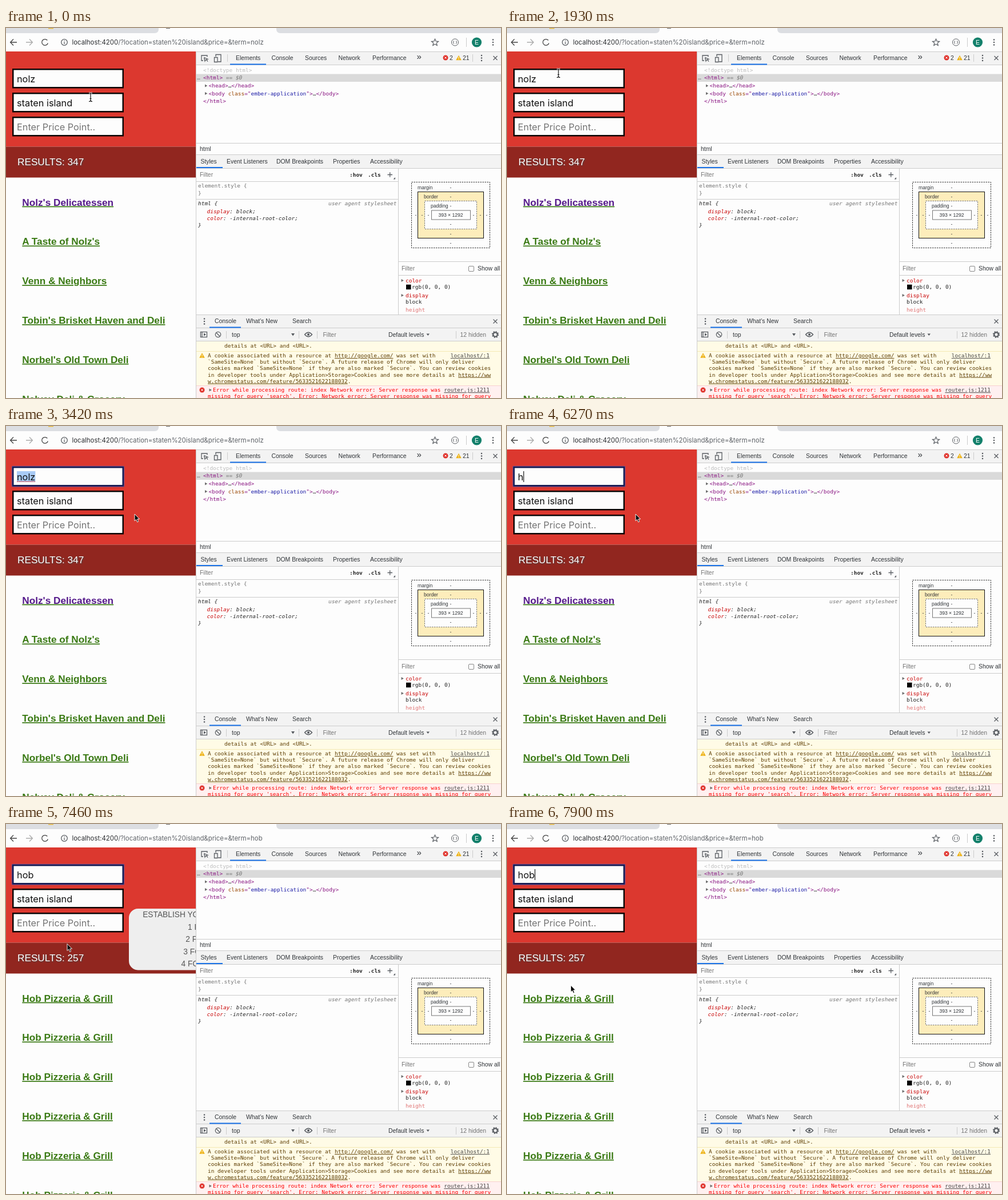
Recreate the animation shown at these times as an HTML page. Size 866 px wide and 647 px high, loop 8000 ms.

```html
<!DOCTYPE html>
<html lang="en">
<head>
<meta charset="utf-8">
<title>Restaurant search</title>
<style>
html, body { margin: 0; width: 100%; height: 100%; overflow: hidden; background: #fdfdfd; }
svg { display: block; }
text { white-space: pre; }
.ui { font: 10.4px "Liberation Sans", Arial, sans-serif; fill: #303438; }
.mono { font: 9.46px "DejaVu Sans Mono", Menlo, monospace; fill: #222; }
.field { font: 16.3px Inter, sans-serif; fill: #111; }
.url { font: 11.4px Inter, sans-serif; fill: #5f6368; }
.page { font: 17.2px "Liberation Sans", Arial, sans-serif; }
.links { font-weight: bold; fill: #3a7a14; text-decoration: underline; }
.seen { fill: #551a8b; }
.count { fill: #fff; filter: drop-shadow(1.8px 1.8px 0.8px #4a4a4a); }
.tip { font-size: 13.76px; fill: #555; text-anchor: middle; }
.box { font-size: 8.6px; }
.dim { fill: #757575; }
.tag { fill: #881280; }
.attr { fill: #994500; }
.val { fill: #1a1aa6; }
.prop { fill: #c80000; }
.warn { fill: #5c3c00; }
.err { fill: #f00; }
.it { font-style: italic; }
.u { text-decoration: underline; }
.end { text-anchor: end; }
.mid { text-anchor: middle; }
.line { stroke: #ccc; fill: none; }
.ico { stroke: #5a5e63; stroke-width: 1.3; fill: none; }
.blue { fill: #1a73e8; }
</style>
</head>
<body>
<svg width="866" height="647" viewBox="0 0 866 647">
  <defs>
    <path id="tri" d="M0-2.6L4.4 0L0 2.6Z" fill="#6e6e6e"/>
    <g id="dots" fill="#55595e"><circle cy="-4.4" r="1.25"/><circle r="1.25"/><circle cy="4.4" r="1.25"/></g>
    <path id="close" d="M-3.5-3.5L3.5 3.5M3.5-3.5L-3.5 3.5" class="ico"/>
    <g id="alert"><path d="M0-4.3L4.8 4.2H-4.8Z" fill="#eeb214"/><path d="M0-1.4V1.4M0 2.3V3.3" stroke="#fff"/></g>
    <g id="fail"><circle r="4.5" fill="#e0332c"/><path d="M-1.7-1.7L1.7 1.7M1.7-1.7L-1.7 1.7" stroke="#fff"/></g>
  </defs>
  <rect width="866" height="647" fill="#fdfdfd"/>

  <!-- browser bar -->
  <path d="M0 0H267V2Q267 9 260 9H0ZM473 0H866V9H480Q473 9 473 2Z" fill="#dcdee2"/>
  <rect x="74" width="9" height="1.4" fill="#e8b93a"/>
  <rect x="280" width="7" height="1" fill="#666"/>
  <g class="ico" stroke-width="1.6">
    <path d="M19 25H8M13 19.5L7.6 25L13 30.5" stroke="#444"/>
    <path d="M35 25H46M41 19.5L46.400 25L41 30.500" stroke="#aaa"/>
    <path d="M72.300 21.500A5.400 5.400 0 1 0 73.300 26.500" stroke="#444"/>
    <circle cx="102" cy="25" r="5.300"/>
    <path d="M102 24.300V28M102 21.800V23"/>
    <path d="M750.500 19.200L752.200 23.200L756.500 23.500L753.200 26.300L754.200 30.500L750.500 28.200L746.800 30.500L747.800 26.300L744.500 23.500L748.800 23.200Z" stroke-width="1.200"/>
    <circle cx="785.500" cy="25" r="6" stroke-width="1"/>
    <path d="M784 22.500Q782.700 22.500 783 24Q783 25 782 25Q783 25 783 26Q782.700 27.500 784 27.500M787 22.500Q788.300 22.500 788 24Q788 25 789 25Q788 25 788 26Q788.300 27.500 787 27.500" stroke-width=".9"/>
  </g>
  <path d="M805.500 17V33" class="line"/>
  <circle cx="823.500" cy="25" r="8.600" fill="#13806b"/>
  <text x="823.500" y="28.500" class="ui mid" style="fill:#fff">E</text>
  <use href="#dots" x="852" y="25"/>
  <text x="115.500" y="29.200" class="url"><tspan fill="#2b2d30">localhost:4200</tspan>/?location=staten%20island&amp;price=&amp;term=<tspan id="term"></tspan></text>

  <!-- search page -->
  <rect y="41" width="333" height="166.500" fill="#dc382f"/>
  <rect y="207.500" width="333" height="54" fill="#91261f"/>
  <rect id="glow" x="9.800" y="69.800" width="197.400" height="37" rx="2" fill="#4a4fa0" opacity=".75"/>
  <g fill="#fdfdfd" stroke="#0b0505" stroke-width="2.500">
    <rect id="query-box" x="12.250" y="72.250" width="192.500" height="32"/>
    <rect x="12.250" y="114.250" width="192.500" height="32"/>
    <rect x="12.250" y="156.250" width="192.500" height="32"/>
  </g>
  <rect id="selection" y="79" height="19" fill="#a9cbf6"/>
  <g class="field">
    <text id="query" x="19" y="94.700"></text>
    <text x="19" y="136.700">staten island</text>
    <text x="19" y="178.700" class="dim">Enter Price Point..</text>
  </g>
  <path id="spell" d="M19.500 97.300H51" stroke="#e03a34" stroke-width="1.500" stroke-dasharray="1.500 1.200"/>
  <rect id="caret" y="79" width="1.100" height="19"/>
  <text x="20" y="240" class="page count">RESULTS: <tspan id="count"></tspan></text>
  <g id="links" class="page links"></g>
  <g id="tip">
    <rect x="215" y="148" width="258" height="107.500" rx="16" fill="#eee"/>
    <g class="page tip">
      <text x="344" y="163.300">ESTABLISH YOUR PRICE POINT</text>
      <text x="344" y="184.800">1 FOR $</text>
      <text x="344" y="206.300">2 FOR $$</text>
      <text x="344" y="227.800">3 FOR $$$</text>
      <text x="344" y="249.300">4 FOR $$$$</text>
    </g>
  </g>

  <!-- developer tools -->
  <rect x="332" y="41" width="534" height="606" fill="#fdfdfd"/>
  <path d="M333 41H866V64H333ZM333 222H866V245H333ZM333 501H866V547H333Z" fill="#f3f3f3"/>
  <rect x="333" y="80.500" width="533" height="13.500" fill="#dadada"/>
  <path d="M333 547.500H866V626H333Z" fill="#fffbe6"/>
  <rect x="333" y="626" width="533" height="21" fill="#fff0f0"/>
  <path d="M333 565.500H866" stroke="#f5e9b4"/>
  <path d="M333 625.500H866" stroke="#f8d0d0"/>
  <path class="line" d="M332.500 41V647M0 41.500M333 41.500H866M333 64.500H866M333 201.500H866M333 221.500H866M333 245.500H866M333 268.500H686M333 299.500H686M686.500 246V501M687 408.500H866M687 432.500H866M333 501.500H866M333 524.500H866M333 547.500H866M387.500 46V59M816.500 46V59M385.500 530V543M512.500 530V543M544.500 530V543M787.500 530V543"/>
  <path class="blue" d="M392 62.500H455V64.500H392ZM333 243H379V245H333ZM356 522.500H411V524.500H356Z"/>

  <g class="ico" stroke-width="1.200">
    <path d="M345 57H342V48H352V50.500M346.500 51.500L353 54.500L350.200 55.200L353 58.500M346.500 51.500L348 58L349.500 55.500"/>
    <path d="M367 50V46.500H376V59H371M364.500 51.500H370V59.500H364.500Z"/>
    <rect x="340.500" y="531.500" width="11" height="9"/>
    <path d="M343 532V540"/>
    <circle cx="371" cy="536" r="4.700"/><path d="M367.700 532.700L374.300 539.300"/>
    <path d="M522.500 536Q529 528.500 535.500 536Q529 543.500 522.500 536Z"/>
    <circle cx="856" cy="536" r="3.700" stroke-width="2.300"/>
    <circle cx="856" cy="536" r="5.300" stroke-width="1.600" stroke-dasharray="2.080"/>
    <path d="M667.500 256.500H676M671.700 252.300V260.700"/>
    <rect x="809.500" y="416.500" width="9" height="9" rx="1.500" fill="#fff" stroke="#888" stroke-width="1"/>
  </g>
  <g fill="#55595e">
    <circle cx="529" cy="536" r="2"/>
    <path d="M346 533.500L350 536L346 538.500ZM499 534H505L502 538.500ZM735.500 534.500H741L738.200 538ZM681 261V264.500H677.500Z"/>
  </g>
  <use href="#dots" x="832" y="52.500"/><use href="#dots" x="347" y="513"/>
  <use href="#close" x="856" y="52.500"/><use href="#close" x="856" y="513"/>
  <use href="#fail" x="769" y="52"/><use href="#fail" x="343" y="633"/>
  <use href="#alert" x="792" y="52"/><use href="#alert" x="343" y="572.500"/>
  <use href="#tri" x="348" y="101"/><use href="#tri" x="348" y="114.500"/>
  <use href="#tri" x="691.500" y="441.500"/><use href="#tri" x="691.500" y="467.500"/>
  <use href="#tri" x="355.500" y="633"/>

  <!-- labels: y is the middle of the line -->
  <g class="ui" transform="translate(0 3.700)">
    <text x="402" y="52.500">Elements</text><text x="464.500" y="52.500">Console</text>
    <text x="523" y="52.500">Sources</text><text x="581.500" y="52.500">Network</text>
    <text x="641" y="52.500">Performance</text><text x="718.500" y="51.500" font-size="15">»</text>
    <text x="776" y="52.500">2</text><text x="799" y="52.500">21</text>
    <text x="339" y="211.500">html</text>
    <text x="340.500" y="233">Styles</text><text x="386" y="233">Event Listeners</text>
    <text x="473" y="233">DOM Breakpoints</text><text x="572" y="233">Properties</text>
    <text x="637" y="233">Accessibility</text>
    <text x="339" y="256.500" class="dim">Filter</text><text x="692" y="420.500" class="dim">Filter</text>
    <text x="825" y="420.500">Show all</text>
    <text x="365" y="512.500">Console</text><text x="420" y="512.500">What's New</text><text x="501" y="512.500">Search</text>
    <text x="395" y="536">top</text><text x="554.500" y="536" class="dim">Filter</text>
    <text x="669" y="536">Default levels</text><text x="794.500" y="536" class="dim">12 hidden</text>
  </g>

  <g class="mono" transform="translate(0 3.200)">
    <text x="345" y="73.500" fill="#bdbdbd">&lt;!doctype html&gt;</text>
    <text x="334" y="87" class="dim">…</text>
    <text x="345" y="87" class="tag">&lt;html&gt;<tspan class="dim"> == <tspan class="it">$0</tspan></tspan></text>
    <text x="354.500" y="101" class="tag">&lt;head&gt;<tspan fill="#222">…</tspan>&lt;/head&gt;</text>
    <text x="354.500" y="114.500" class="tag">&lt;body <tspan class="attr">class</tspan>="<tspan class="val">ember-application</tspan>"&gt;<tspan fill="#222">…</tspan>&lt;/body&gt;</text>
    <text x="345" y="128.300" class="tag">&lt;/html&gt;</text>

    <g font-weight="bold"><text x="601" y="256.500">:hov</text><text x="633" y="256.500">.cls</text></g>
    <text x="336" y="275.500" class="dim">element.style {</text><text x="336" y="289" class="dim">}</text>
    <g class="it">
      <text x="336" y="306.500">html {</text>
      <text x="683.500" y="306.500" class="dim end">user agent stylesheet</text>
      <text x="351.500" y="320.500"><tspan class="prop">display</tspan>: block;</text>
      <text x="351.500" y="332.500"><tspan class="prop">color</tspan>: -internal-root-color;</text>
      <text x="336" y="344.500">}</text>
    </g>
    <rect x="700" y="445.500" width="8.500" height="8.500" fill="#000"/>
    <text x="699" y="441.500" class="prop">color</text><text x="710" y="453">rgb(0, 0, 0)</text>
    <text x="699" y="467.500" class="prop">display</text><text x="699" y="478.500">block</text>
    <text x="699" y="493" class="prop" opacity=".55">height</text>

    <g class="warn">
      <text x="382" y="556">details at &lt;URL&gt; and &lt;URL&gt;.</text>
      <text x="353" y="573">A cookie associated with a resource at <tspan class="u">http://google.com/</tspan> was set with</text>
      <text x="846" y="573" class="u end" fill="#444">localhost/:1</text>
      <text x="353" y="584.200">`SameSite=None` but without `Secure`. A future release of Chrome will only deliver</text>
      <text x="353" y="595.300">cookies marked `SameSite=None` if they are also marked `Secure`. You can review cookies</text>
      <text x="353" y="606.400">in developer tools under Application&gt;Storage&gt;Cookies and see more details at <tspan class="u">https://ww</tspan></text>
      <text x="353" y="617.500"><tspan class="u">w.chromestatus.com/feature/5633521622188032</tspan>.</text>
    </g>
    <g class="err">
      <text x="362" y="633">Error while processing route: index Network error: Server response was</text>
      <text x="846" y="633" class="u end" fill="#444">router.js:1211</text>
      <text x="353" y="644.300">missing for query 'search'. Error: Network error: Server response was missing for query</text>
    </g>
  </g>

  <!-- box model -->
  <g fill="#fdfdfd" stroke="#333">
    <rect x="709.500" y="269.500" width="137" height="115" stroke-dasharray="2.500 1.500"/>
    <rect x="720.500" y="286.500" width="115" height="81" fill="#fdedbb" stroke="#111"/>
    <rect x="732.500" y="302.500" width="91" height="49" stroke="#777" stroke-dasharray="2.500 1.500"/>
    <rect x="744.500" y="319" width="68" height="16" stroke="#777"/>
  </g>
  <g class="ui box" transform="translate(0 3)">
    <text x="720" y="279">margin</text><text x="731" y="295">border</text><text x="743" y="311">padding</text>
    <g class="mid">
      <text x="778" y="327">393 × 1292</text>
      <g id="dashes"></g>
    </g>
  </g>

  <!-- pointers -->
  <g id="beam" fill="none">
    <path id="beam-shape" d="M-3-7.500Q0-7.500 0-5.500Q0-7.500 3-7.500M0-5.500V5.500M-3 7.500Q0 7.500 0 5.500Q0 7.500 3 7.500M-1.500 2.500H1.500" stroke="#fff" stroke-opacity=".6" stroke-width="2.400"/>
    <use href="#beam-shape" style="stroke-opacity:1"/>
    <path d="M-3-7.500Q0-7.500 0-5.500Q0-7.500 3-7.500M0-5.500V5.500M-3 7.500Q0 7.500 0 5.500Q0 7.500 3 7.500M-1.500 2.500H1.500" stroke="#111" stroke-width="1.200"/>
  </g>
  <path id="arrow" d="M0 0V12L2.700 9.500L4.700 14L6.700 13.100L4.800 8.700H8.500Z" fill="#0a0a0a" stroke="#fff" stroke-width=".9"/>
</svg>

<script>
const LOOP = 8000;
const $ = id => document.getElementById(id);
const show = (id, on) => $(id).style.display = on ? '' : 'none';

// Each track holds [start, value...]; a value lasts until the next start.
const pointer = [
  [0, 148, 121], [150, 158, 128], [300, 165, 134], [450, 168, 137], [600, 164, 135],
  [740, 157, 131], [890, 150, 128], [1040, 143, 125], [1180, 139, 123],
  [1330, 135, 121], [1480, 131, 119], [1780, 110, 98], [1930, 90, 79],
  [2530, 48, 84], [2680, 22, 86], [2820, 4, 86], [3270, 130, 128],
  [3420, 225, 154, 'arrow'], [7460, 107, 209.5, 'arrow'], [7600, 109, 234, 'arrow'],
  [7750, 111, 260, 'arrow'], [7900, 111.5, 282, 'arrow']
];
const typed = [[0, 'nolz'], [6270, 'h'], [6420, 'ho'], [6720, 'hob']];
const terms = [[0, 'nolz'], [6420, 'h'], [6720, 'hob']];
const picked = [[0, 0], [2530, 1], [2680, 3], [2820, 4], [6270, 0]];
const carets = [[0, false], [2380, true], [2530, false], [6270, true], [7170, false], [7750, true]];
const names = ["Nolz's Delicatessen", "A Taste of Nolz's", 'Venn & Neighbors',
  "Tobin's Brisket Haven and Deli", "Norbel's Old Town Deli", 'Nelvey Deli & Grocery'];

const at = (track, t) => track.findLast(step => step[0] <= t);
const valueAt = (track, t) => at(track, t)[1];

function addText(parent, x, y, text) {
  const el = document.createElementNS('http://www.w3.org/2000/svg', 'text');
  el.setAttribute('x', x);
  el.setAttribute('y', y);
  el.textContent = text;
  $(parent).append(el);
  return el;
}

const links = names.map((name, i) => addText('links', 28.3, 310.6 + i * 68.8, name));
for (const y of [279, 295, 311, 343, 360, 376]) addText('dashes', 778, y, '-');
for (const x of [717, 728, 739, 818, 830, 841]) addText('dashes', x, 327, '-');

function draw(t) {
  const [, x, y, shape = 'beam'] = at(pointer, t);
  for (const id of ['beam', 'arrow']) show(id, id === shape);
  $(shape).setAttribute('transform', `translate(${x} ${y})`);

  const query = $('query');
  const text = valueAt(typed, t);
  query.textContent = text;
  $('term').textContent = valueAt(terms, t);

  const focused = t >= 2380;
  show('glow', focused);
  $('query-box').style.stroke = focused ? '#141a52' : '';
  show('spell', focused && t < 6270);

  const width = query.getComputedTextLength();
  const count = valueAt(picked, t);
  const chosen = count ? query.getSubStringLength(text.length - count, count) : 0;
  $('selection').setAttribute('x', 19 + width - chosen);
  $('selection').setAttribute('width', chosen);
  show('caret', valueAt(carets, t));
  $('caret').setAttribute('x', 19 + width);

  const found = t >= 6720;
  $('count').textContent = found ? 257 : 347;
  links.forEach((link, i) => {
    link.textContent = found ? 'Hob Pizzeria & Grill' : names[i];
    link.classList.toggle('seen', !found && i === 0);
  });
  show('tip', t >= 7460 && t < 7600);
}

const start = performance.now();
function tick() {
  draw((performance.now() - start) % LOOP);
  requestAnimationFrame(tick);
}
tick();
</script>
</body>
</html>
```
